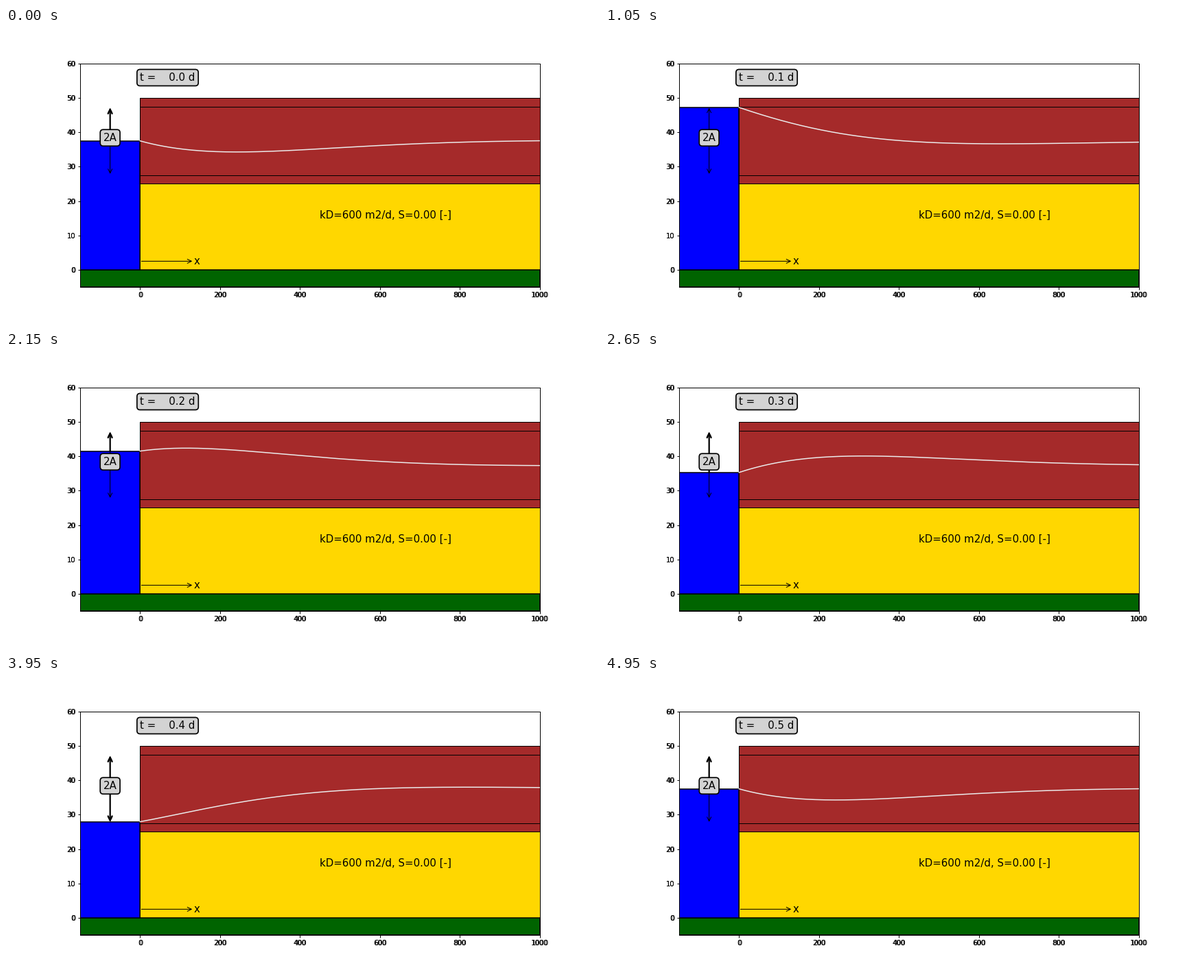
A matplotlib script that plays this animation: 864 px wide and 432 px high, repeating every 5000 ms.

```python
import matplotlib.pyplot as plt
import numpy as np
from matplotlib.animation import FuncAnimation
from matplotlib.patches import FancyArrowPatch, Rectangle
from matplotlib.transforms import offset_copy

FRAMES, INTERVAL = 100, 50
MEAN, AMP = 37.5, 10.0          # mean level and tidal amplitude
PERIOD = 0.5                    # days
KD, S = 600.0, 0.001
LEFT, RIGHT, BOTTOM, TOP = -150, 1000, -5, 60
OMEGA = 2 * np.pi / PERIOD
DAMP = np.sqrt(OMEGA * S / (2 * KD))

plt.rcParams["font.family"] = "DejaVu Sans"
plt.rcParams["axes.linewidth"] = 1
fig = plt.figure(figsize=(12, 6), dpi=72, facecolor="white")
ax = fig.add_axes([0.125, 0.125, 0.775, 0.755], facecolor="white")
ax.set(xlim=(LEFT, RIGHT), ylim=(BOTTOM, TOP))
ax.set_xticks(range(0, 1001, 200))
ax.set_yticks(range(0, 61, 10))
ax.tick_params(labelbottom=False, labelleft=False, width=1)


def block(x0, x1, y0, y1, color, lw=1):
    return ax.add_patch(Rectangle((x0, y0), x1 - x0, y1 - y0, facecolor=color,
                                  edgecolor="black", lw=lw))


def arrow(start, end, style, lw, zorder=2.5):
    ax.add_patch(FancyArrowPatch(start, end, arrowstyle=style, lw=lw,
                                 mutation_scale=15, color="black",
                                 shrinkA=2, shrinkB=2, zorder=zorder))


def label(x, y, text, **kw):
    return ax.text(x, y, text, fontsize=15, **kw)


def tick_labels():
    # Each label is struck twice, one pixel apart.
    for dx in (0, 1):
        below = offset_copy(ax.get_xaxis_transform(), fig, dx, -7, units="dots")
        beside = offset_copy(ax.get_yaxis_transform(), fig, dx - 7, 0, units="dots")
        for v in ax.get_xticks():
            ax.text(v, 0, f"{v:.0f}", fontsize=10, ha="center", va="top",
                    transform=below)
        for v in ax.get_yticks():
            ax.text(0, v, f"{v:.0f}", fontsize=10, ha="right",
                    va="center_baseline", transform=beside)


box = dict(boxstyle="round,pad=0.3", facecolor="lightgray", edgecolor="black", lw=1.7)

block(0, RIGHT, 25, 50, "brown")
block(0, RIGHT, 0, 25, "gold")
block(LEFT, RIGHT, BOTTOM, 0, "darkgreen", lw=1.5)
sea = block(LEFT, 0, 0, MEAN, "blue", lw=1.5)

for level in (MEAN - AMP, MEAN + AMP):
    ax.plot([0, RIGHT], [level, level], color="black", lw=1)
x = np.linspace(0, RIGHT, 201)
head, = ax.plot(x, x, color="#ececec", lw=1.5)

# The range arrow is bold in air and thin where the water covers it.
low, high = (-75, MEAN - AMP), (-75, MEAN + AMP)
arrow(low, high, "<->", 2.2, zorder=0.5)
arrow(low, high, "<->", 1)
arrow((0, 2.5), (134, 2.5), "->", 1)
label(-75, MEAN, "2A", ha="center", bbox=box)
label(135, 2.5, "x", va="center")
label(450, 15, f"kD={KD:.0f} m2/d, S={S:.2f} [-]")
clock = label(0, 55, "", bbox=box)
tick_labels()


def update(i):
    t = PERIOD * i / (FRAMES - 1)
    h = MEAN + AMP * np.exp(-DAMP * x) * np.sin(OMEGA * t - DAMP * x)
    head.set_ydata(h)
    sea.set_height(h[0])
    clock.set_text(f"t = {t:6.1f} d")
    return sea, head, clock


anim = FuncAnimation(fig, update, frames=FRAMES, interval=INTERVAL,
                     repeat=True, repeat_delay=0, blit=False)
plt.show()
```
